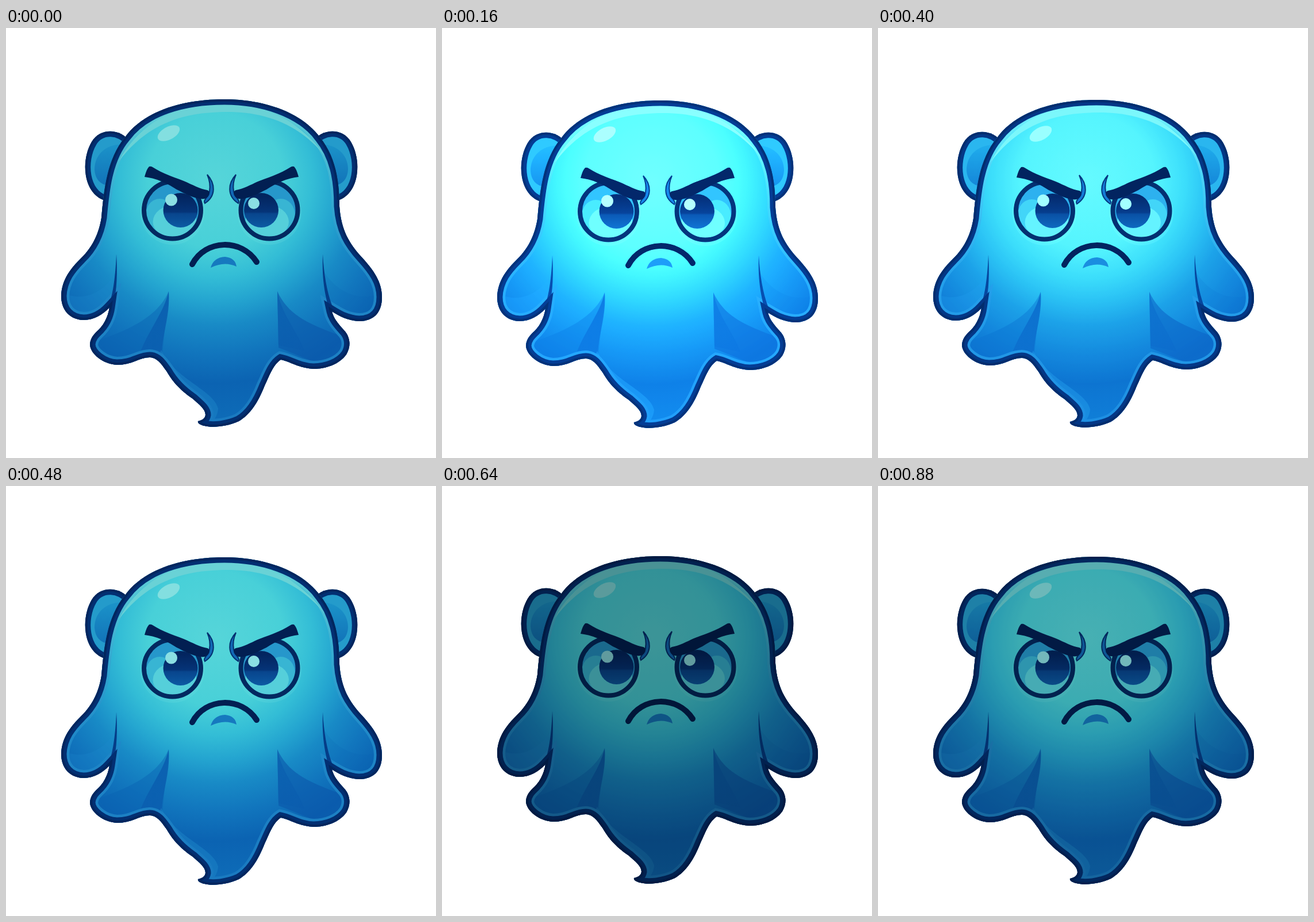
Recreate the animation shown at these times as an HTML page. Size 748 by 748 pixels, loop 960 ms.

```html
<!DOCTYPE html>
<html lang="en">
<head>
<meta charset="utf-8">
<title>Grumpy ghost</title>
<style>
  html, body { margin: 0; width: 100%; height: 100%; overflow: hidden; background: #fff; }
  svg { display: block; width: 100vw; height: 100vh; animation: pulse 960ms step-end infinite; }

  /* One sine wave in twelve held steps: brightness 1 ± .35, height ± 2px */
  @keyframes pulse {
    0%, 50%, 100%    { filter: brightness(1);     transform: translateY(0); }
    8.3333%, 41.6667% { filter: brightness(1.175); transform: translateY(1px); }
    16.6667%, 33.3333% { filter: brightness(1.303); transform: translateY(2px); }
    25%              { filter: brightness(1.35);  transform: translateY(2px); }
    58.3333%, 91.6667% { filter: brightness(.825);  transform: translateY(-1px); }
    66.6667%, 83.3333% { filter: brightness(.697);  transform: translateY(-2px); }
    75%              { filter: brightness(.65);   transform: translateY(-2px); }
  }

  .line { fill: none; stroke: #032f72; stroke-width: 19; }
  .edge { fill: none; stroke: #02265e; stroke-width: 8; }
  .rim { fill: none; stroke: url(#rim); stroke-width: 28; }
  .ink { fill: #021f52; }
</style>
</head>
<body>
<svg viewBox="0 0 748 748">
  <defs>
    <radialGradient id="skin" gradientUnits="userSpaceOnUse" cx="365" cy="265" r="420">
      <stop offset="0" stop-color="#56d5d9"/>
      <stop offset=".28" stop-color="#48d0d8"/>
      <stop offset=".4" stop-color="#33bdd6"/>
      <stop offset=".5" stop-color="#24a5d0"/>
      <stop offset=".6" stop-color="#188ac6"/>
      <stop offset=".72" stop-color="#1175bd"/>
      <stop offset=".84" stop-color="#0b63b2"/>
      <stop offset="1" stop-color="#0e6cb8"/>
    </radialGradient>
    <linearGradient id="rim" gradientUnits="userSpaceOnUse" x1="0" y1="124" x2="0" y2="694">
      <stop offset="0" stop-color="#66d3d7"/>
      <stop offset=".3" stop-color="#35abd1"/>
      <stop offset=".55" stop-color="#1f88c8"/>
      <stop offset="1" stop-color="#1979c0"/>
    </linearGradient>
    <linearGradient id="ear" x1="0" y1="0" x2="0" y2="1">
      <stop offset="0" stop-color="#1b93c9"/>
      <stop offset="1" stop-color="#1172b8"/>
    </linearGradient>
    <linearGradient id="iris" x1="0" y1="0" x2="0" y2="1">
      <stop offset=".1" stop-color="#03255f"/>
      <stop offset=".55" stop-color="#053478"/>
      <stop offset=".6" stop-color="#08458d"/>
      <stop offset="1" stop-color="#0c5aa3"/>
    </linearGradient>
    <linearGradient id="fold" x1="0" y1="0" x2="0" y2="1">
      <stop offset="0" stop-color="#0a60b0"/>
      <stop offset="1" stop-color="#0a5cae" stop-opacity=".75"/>
    </linearGradient>

    <path id="body" d="M380 124C444 124 512 144 546 190C572 222 580 262 580 310C583 352 597 375 620 400
      C640 422 654 442 654 468C654 497 638 510 614 510C594 509 580 501 567 493C570 507 582 519 590 528
      C598 538 601 553 592 568C580 585 556 593 535 593C510 592 494 580 478 577C464 586 457 608 450 622
      C438 652 425 672 405 684C385 693 360 696 345 692C337 690 333 687 334 684C341 682 346 680 347 673
      C347 663 336 655 325 645C300 628 288 612 280 598C272 587 264 573 250 573C232 573 220 586 193 586
      C170 585 146 567 146 550C147 537 156 530 163 523C172 513 178 500 180 486C168 499 152 508 135 508
      C110 507 96 490 96 466C97 437 113 418 130 401C152 380 162 355 166 330C170 285 175 228 207 190
      C241 143 310 124 380 124Z"/>
    <path id="earShape" d="M215 197C200 176 165 172 149 198C129 232 135 289 172 300L195 296Z"/>
    <clipPath id="inBody"><use href="#body"/></clipPath>
    <clipPath id="inEar"><use href="#earShape"/></clipPath>
    <clipPath id="inEye"><circle r="50"/></clipPath>

    <g id="earArt" clip-path="url(#inEar)">
      <use href="#earShape" fill="#249bcb"/>
      <path d="M208 203C180 199 154 216 154 246C155 263 163 273 185 276Z" fill="url(#ear)"/>
      <path d="M208 203C185 217 179 238 173 268L190 280Z" fill="#1271b7" opacity=".6"/>
      <use href="#earShape" class="line"/>
      <use href="#earShape" class="edge"/>
    </g>

    <g id="brow">
      <path d="M350 255C364 270 366 292 346 305C342 299 351 296 354 284C356 272 354 264 350 255Z"
        fill="#1169b5" stroke="#03306f" stroke-width="2"/>
      <path class="ink" d="M241 259C243 252 245 245 249 241Q252 240 255 242C272 253 291 259 309 266
        C325 273 338 280 350 282Q356 284 353 291Q349 299 338 297C324 295 311 288 297 281
        Q268 262 241 259Z"/>
    </g>

    <g id="eye">
      <circle r="56" cy="4" fill="#7be2e0" opacity=".18"/>
      <circle r="50" fill="#2697cb"/>
    </g>
    <circle id="pupil" r="30" fill="url(#iris)"/>
    <circle id="ring" r="49.5" fill="none" stroke="#032960" stroke-width="8"/>
  </defs>

  <use href="#earArt"/>
  <use href="#earArt" transform="matrix(-1 0 0 1 749 0)"/>

  <g clip-path="url(#inBody)">
    <use href="#body" fill="url(#skin)"/>

    <!-- arms -->
    <path d="M108 464C133 473 166 465 190 427L188 488L130 510L98 490Z" fill="#1f87cc" opacity=".25"/>
    <path d="M642 464C617 474 577 462 553 424L560 488L620 512L652 490Z" fill="#0a5fb0" opacity=".15"/>

    <!-- cape folds -->
    <path d="M283 458C265 500 222 522 160 544L190 582L272 566Z" fill="#0b62b2" opacity=".45"/>
    <path d="M283 458C274 497 248 524 232 568L271 566C272 530 286 500 283 458Z" fill="url(#fold)"/>
    <path d="M472 458C493 504 533 517 594 540L560 590L474 556Z" fill="#0a57aa" opacity=".6"/>
    <path d="M472 458C480 498 503 522 520 562L474 552Z" fill="url(#fold)" opacity=".8"/>

    <!-- tail -->
    <path d="M270 560C292 610 362 630 369 662Q368 680 350 692L325 650L260 580Z" fill="#1c84c8" opacity=".5"/>
    <path d="M478 565C450 590 448 640 400 675L420 690L470 610Z" fill="#1677c0" opacity=".5"/>

    <use href="#body" class="rim"/>
    <path d="M196 232C242 147 320 132 380 132C450 133 512 160 556 224C508 164 446 146 385 146
      C310 146 247 165 196 232Z" fill="#69d2d6"/>
    <path d="M192 393C194 425 193 455 187 482L179 504L173 494C185 474 190 440 192 393Z" fill="#053d88"/>
    <path d="M551 393C553 428 558 458 567 482L574 496L567 504C556 474 549 440 551 393Z" fill="#053d88"/>
    <use href="#body" class="line"/>
    <use href="#body" class="edge"/>
  </g>

  <ellipse rx="21" ry="11" transform="translate(283 183) rotate(-28)" fill="#83dfe0"/>

  <g transform="translate(289.5 317)">
    <use href="#eye"/>
    <g clip-path="url(#inEye)">
      <ellipse cx="-22" cy="9" rx="25" ry="29" fill="#38b5d3"/>
      <ellipse cx="4" cy="20" rx="38" ry="29" fill="#55cfda"/>
      <use href="#pupil" x="14"/>
    </g>
    <use href="#ring"/>
    <circle cx="-2" cy="-18" r="10.5" fill="#8bdfe3"/>
  </g>
  <g transform="translate(458 317)">
    <use href="#eye"/>
    <g clip-path="url(#inEye)">
      <ellipse cx="20" cy="9" rx="25" ry="29" fill="#38b5d3"/>
      <ellipse cx="-4" cy="20" rx="38" ry="29" fill="#55cfda"/>
      <use href="#pupil" x="-14"/>
    </g>
    <use href="#ring"/>
    <circle cx="-27" cy="-12" r="10" fill="#8bdfe3"/>
  </g>

  <use href="#brow"/>
  <use href="#brow" transform="matrix(-1 0 0 1 750 0)"/>

  <path d="M324 411C347 367 410 366 436 407" fill="none" stroke="#021f52" stroke-width="10" stroke-linecap="round"/>
  <path d="M356 417Q361 399 381 398Q399 400 401 415Q380 405 356 417Z" fill="#1679bf"/>
</svg>
</body>
</html>
```
